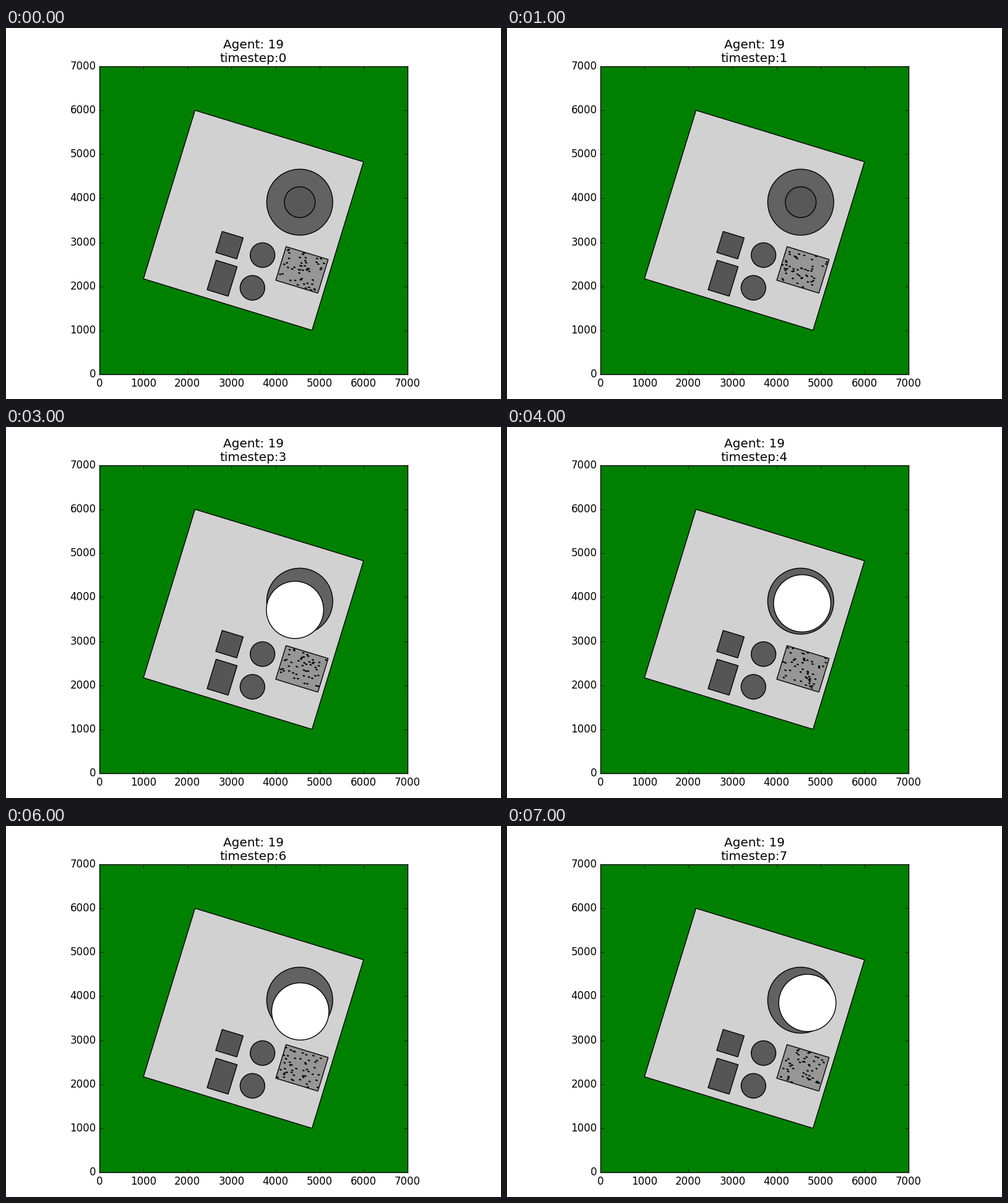
Write a matplotlib script that moves like this. It is 800 px wide and 600 px high and loops after 8000 ms.

```python
import numpy as np
import matplotlib.pyplot as plt
from matplotlib.animation import FuncAnimation
from matplotlib.collections import EllipseCollection
from matplotlib.patches import Circle, Rectangle

W, H, DPI = 800, 600, 100
STEPS, STEP_MS = 8, 1000
TILT = 17
N_DOTS = 50
PEN_CORNER, PEN_SIZE = (4006, 2137), (1000, 800)

# Centre of the white disc at each timestep; it is hidden before the first.
DISC_PATH = {
    2: (4709, 4189),
    3: (4442, 3714),
    4: (4583, 3863),
    5: (4698, 3885),
    6: (4563, 3656),
    7: (4701, 3850),
}

plt.style.use("classic")
plt.rcParams["font.family"] = "DejaVu Sans"

fig = plt.figure(figsize=(W / DPI, H / DPI), dpi=DPI, facecolor="white")
ax = fig.add_axes([151 / W, 40 / H, 498 / W, 498 / H], facecolor="#008000")
ax.set_xlim(0, 7000)
ax.set_ylim(0, 7000)
ax.set_xticks(range(0, 7001, 1000))
ax.set_yticks(range(0, 7001, 1000))

angle = np.radians(TILT)
along = np.array([np.cos(angle), -np.sin(angle)])
across = np.array([np.sin(angle), np.cos(angle)])


def tilted_rect(corner, size, color):
    ax.add_patch(Rectangle(corner, *size, angle=-TILT, facecolor=color,
                           edgecolor="black", linewidth=1, zorder=2))


def disc(center, radius, color, zorder=2):
    patch = Circle(center, radius, facecolor=color, edgecolor="black",
                   linewidth=1, zorder=zorder)
    return ax.add_patch(patch)


side = 5000 / (np.cos(angle) + np.sin(angle))
tilted_rect((1000, 1000 + side * np.sin(angle)), (side, side), "#d1d1d1")
disc((4550, 3912), 750, "#626262")
disc((4550, 3912), 350, "#585858")
tilted_rect((2642, 2769), (500, 500), "#555555")
tilted_rect((2446, 1922), (500, 700), "#555555")
disc((3705, 2709), 280, "#5a5a5a")
disc((3476, 1965), 280, "#5a5a5a")
tilted_rect(PEN_CORNER, PEN_SIZE, "#969696")

dots = EllipseCollection([56] * N_DOTS, [34] * N_DOTS, [-TILT] * N_DOTS,
                         units="xy", offsets=np.zeros((N_DOTS, 2)),
                         offset_transform=ax.transData,
                         facecolors="black", linewidths=0, zorder=3)
ax.add_collection(dots, autolim=False)
mover = disc((0, 0), 650, "white", zorder=4)
title = ax.set_title("")


def scatter_dots(step):
    rng = np.random.default_rng(19 + step)
    u, v = rng.uniform(0.02, 0.98, (2, N_DOTS, 1)) * np.reshape(PEN_SIZE, (2, 1, 1))
    return np.array(PEN_CORNER) + u * along + v * across


def draw(step):
    title.set_text(f"Agent: 19\ntimestep:{step}")
    dots.set_offsets(scatter_dots(step))
    mover.set_visible(step in DISC_PATH)
    if step in DISC_PATH:
        mover.center = DISC_PATH[step]
    return title, dots, mover


anim = FuncAnimation(fig, draw, frames=STEPS, interval=STEP_MS,
                     repeat=True, repeat_delay=0, blit=False)
plt.show()
```
